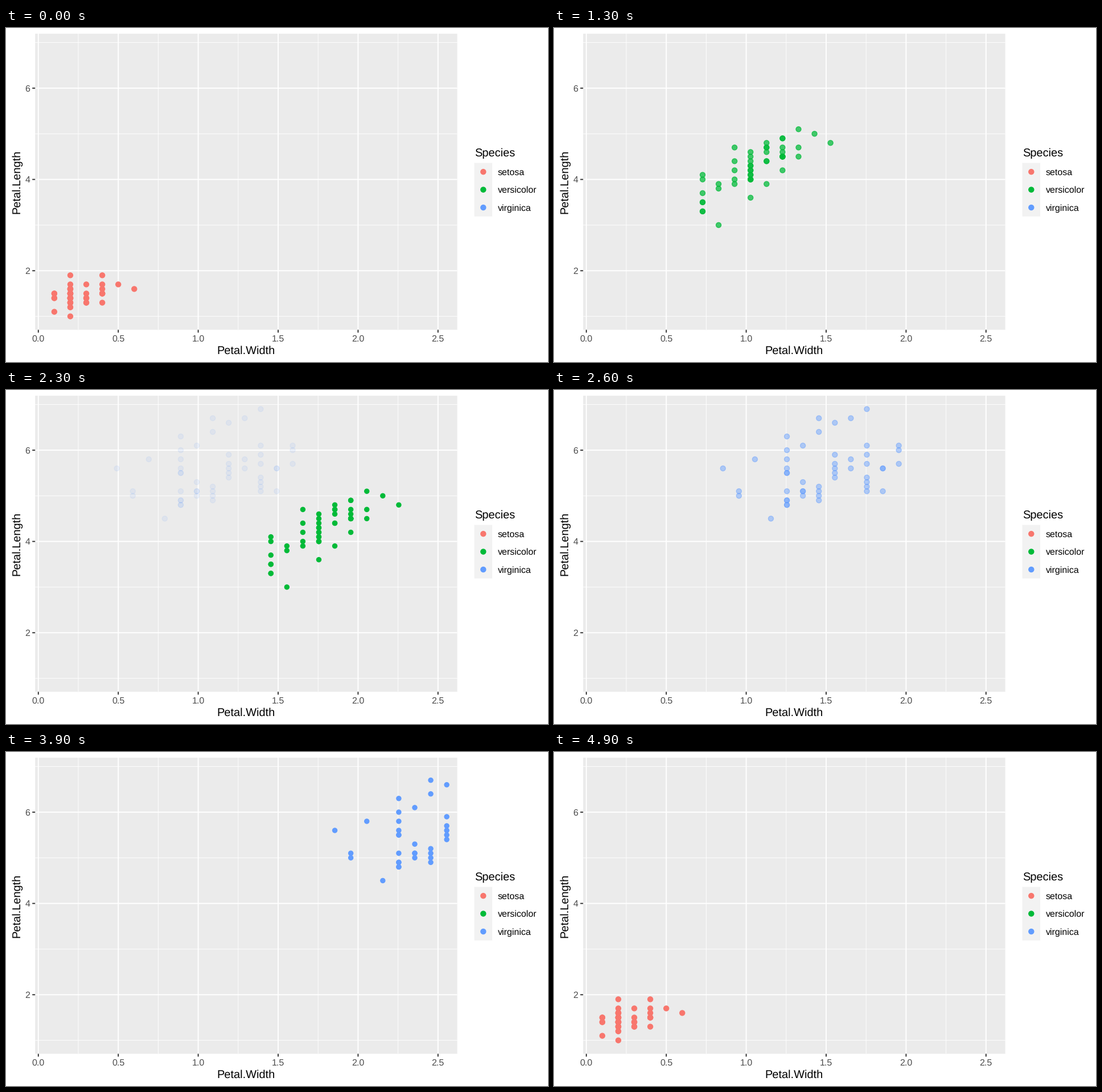
A matplotlib script that plays this animation: 952x588 px, repeating every 5000 ms.

```python
import matplotlib.pyplot as plt
from matplotlib.animation import FuncAnimation
from matplotlib.collections import PatchCollection
from matplotlib.colors import to_rgba
from matplotlib.patches import Circle, Rectangle

plt.rcParams["font.family"] = "Liberation Sans"
plt.rcParams["text.hinting"] = "none"

W, H, DPI = 952, 588, 100
PT = 72 / DPI  # points per pixel
LEFT, RIGHT, TOP, BOTTOM = 51.2, 792.6, 10, 531.3
RADIUS, STROKE = 4.53, 1.29
FRAMES, STEPS, MOVE = 50, 50, 11
STARTS = (5, 22, 39)  # step at which each species begins to leave
ENTER_SHIFT, EXIT_SHIFT = -1, 5

# Petal width -> petal lengths, both in tenths of a cm.
SETOSA = {
    1: [15] * 2 + [14] * 2 + [11],
    2: [14] * 8 + [15] * 7 + [16] * 5 + [13] * 4 + [12] * 2 + [17, 10, 19],
    3: [14] * 3 + [13] * 2 + [15, 17],
    4: [15] * 3 + [13, 16, 17, 19],
    5: [17],
    6: [16],
}
VERSICOLOR = {
    10: [33] * 2 + [35] * 2 + [37, 40, 41],
    11: [30, 38, 39],
    12: [39, 40, 42, 44, 47],
    13: [40] * 3 + [41, 42, 43] * 2 + [36, 44, 45, 46],
    14: [44, 47] * 2 + [39, 46, 48],
    15: [45] * 5 + [49] * 2 + [42, 46, 47],
    16: [45, 47, 51],
    17: [50],
    18: [48],
}
VIRGINICA = {
    14: [56],
    15: [50, 51],
    16: [58],
    17: [45],
    18: [48, 49, 55] * 2 + [51, 56, 58, 60, 63],
    19: [51] * 2 + [50, 53, 61],
    20: [49, 50, 51, 52, 64, 67],
    21: [54, 55, 56, 57, 59, 66],
    22: [56, 58, 67],
    23: [51, 52, 53, 54, 57, 59, 61, 69],
    24: [56] * 2 + [51],
    25: [57, 60, 61],
}
SPECIES = [
    ("setosa", "#F8766D", SETOSA),
    ("versicolor", "#00BA38", VERSICOLOR),
    ("virginica", "#619CFF", VIRGINICA),
]


def px(width):
    return 56.8 + 280.8 * width


def py(length):
    return 588 - 80.35 * length


fig = plt.figure(figsize=(W / DPI, H / DPI), dpi=DPI, facecolor="white")
ax = fig.add_axes([0, 0, 1, 1])
ax.set_xlim(0, W)
ax.set_ylim(H, 0)
ax.axis("off")


def rect(x0, y0, x1, y1, color):
    box = Rectangle((x0, y0), x1 - x0, y1 - y0, fc=color, lw=0, zorder=0, snap=False)
    return ax.add_patch(box)


def line(xs, ys, color, width, order):
    ax.plot(xs, ys, color=color, lw=width * PT, zorder=order, snap=False,
            solid_capstyle="butt")


def text(x, y, label, size, color="black", **kw):
    ax.text(x, y, label, fontsize=size * PT, color=color, va="baseline", **kw)


def grid_x(value, width, order):
    line([px(value)] * 2, [TOP, BOTTOM], "white", width, order)


def grid_y(value, width, order):
    line([LEFT, RIGHT], [py(value)] * 2, "white", width, order)


def draw_panel():
    panel = rect(LEFT, TOP, RIGHT, BOTTOM, "#EBEBEB")
    for y in (1, 3, 5, 7):
        grid_y(y, 0.97, 1)
    for i in range(5):
        grid_x(0.25 + i / 2, 0.97, 1)
    for y in (2, 4, 6):
        grid_y(y, 1.94, 2)
        line([LEFT - 5, LEFT], [py(y)] * 2, "#333333", 1.94, 2)
        text(42.2, py(y) + 5.7, str(y), 16, "#4D4D4D", ha="right")
    for i in range(6):
        x = i / 2
        grid_x(x, 1.94, 2)
        line([px(x)] * 2, [BOTTOM, BOTTOM + 5], "#333333", 1.94, 2)
        text(px(x), 551.8, f"{x:.1f}", 16, "#4D4D4D", ha="center")
    text((LEFT + RIGHT) / 2, 574, "Petal.Width", 20, ha="center")
    ax.text(24.6, (TOP + BOTTOM) / 2, "Petal.Length", fontsize=20 * PT, rotation=90,
            rotation_mode="anchor", ha="center", va="baseline")
    return panel


def draw_legend():
    x, y, key = 822.6, 237.5, 31.42
    text(x, 225.6, "Species", 20)
    rect(x, y, x + key, y + 3 * key, "#F2F2F2")
    for i, (name, color, _) in enumerate(SPECIES):
        cy = y + (i + 0.5) * key
        ax.add_patch(Circle((x + key / 2, cy), RADIUS, fc=color, ec=color,
                            lw=STROKE * PT, zorder=3))
        text(864, cy + 5.7, name, 16)


panel = draw_panel()
draw_legend()

points = [[(w / 10, n / 10) for w, lengths in data.items() for n in lengths]
          for _, _, data in SPECIES]
clouds = []
for _ in SPECIES:
    cloud = PatchCollection([], zorder=4, snap=False)
    ax.add_collection(cloud, autolim=False)
    cloud.set_clip_path(panel)
    clouds.append(cloud)


def place(i, shift=0, scale=1, alpha=1):
    cloud = clouds[i]
    cloud.set_visible(True)
    cloud.set_paths([Circle((px(w + shift), py(n)), RADIUS * scale)
                     for w, n in points[i]])
    color = to_rgba(SPECIES[i][1], alpha)
    cloud.set_facecolor(color)
    cloud.set_edgecolor(color)
    cloud.set_linewidth(STROKE * scale * PT)


def update(frame):
    step = round(frame * STEPS / (FRAMES - 1))
    for cloud in clouds:
        cloud.set_visible(False)
    for i, start in enumerate(STARTS):
        if step <= start:
            place(i)
            break
        if step < start + MOVE:
            p = (step - start) / MOVE
            place(i, shift=EXIT_SHIFT * p, scale=1 - p)
            place((i + 1) % 3, shift=ENTER_SHIFT * (1 - p), alpha=p)
            break
    else:
        place(0)
    return clouds


anim = FuncAnimation(fig, update, frames=FRAMES, interval=100, repeat=True,
                     repeat_delay=0, blit=False)
plt.show()
```
